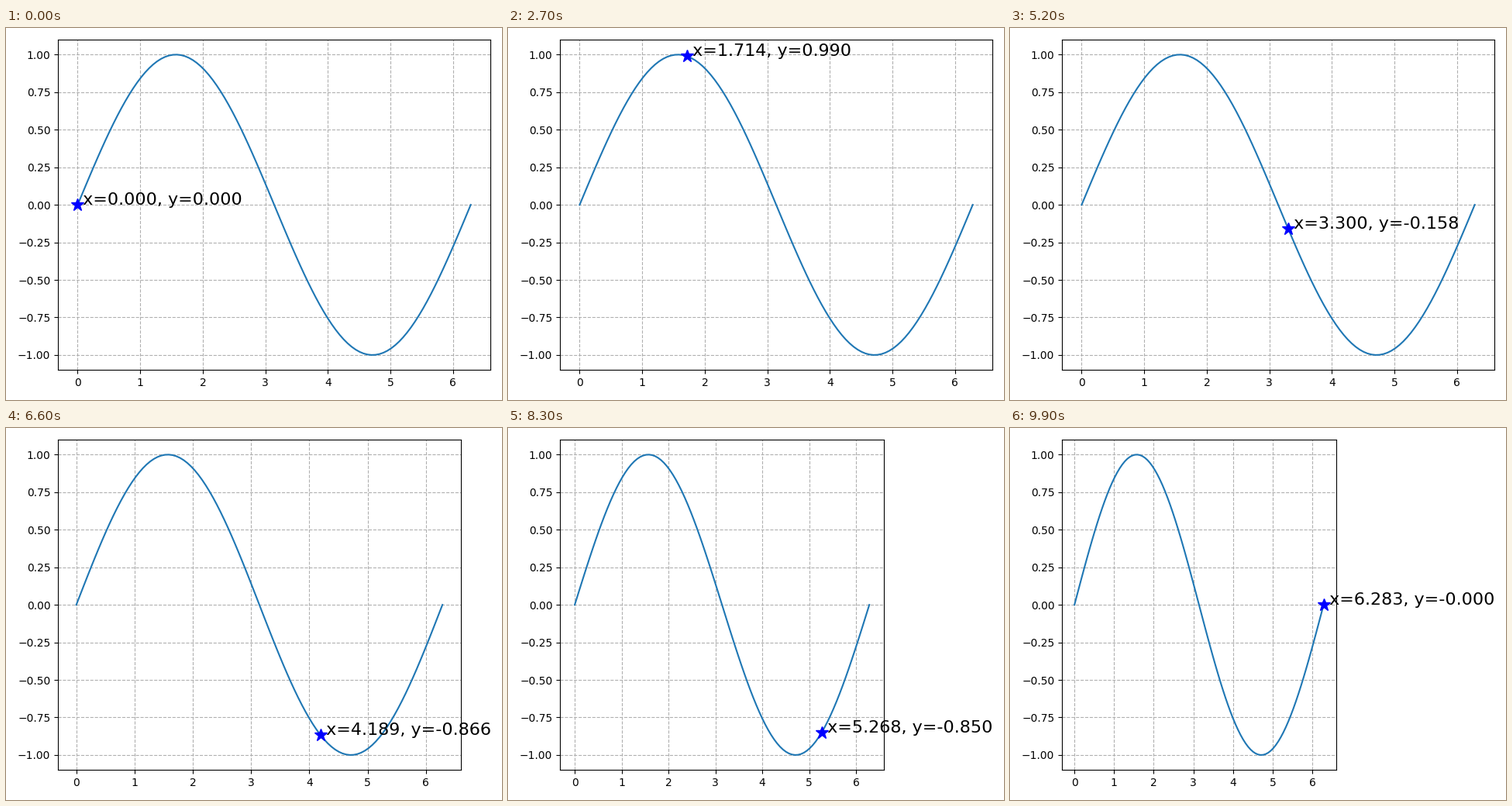
Animation, 640 px wide and 480 px high, one loop 10000 ms. Source, as a matplotlib script:

```python
import numpy as np
import matplotlib.pyplot as plt
from matplotlib.animation import FuncAnimation

STEPS = 100
WIDTH, HEIGHT, DPI = 640, 480, 100

x = np.linspace(0, 2 * np.pi, STEPS)
y = np.sin(x)

fig, ax = plt.subplots(figsize=(WIDTH / DPI, HEIGHT / DPI), dpi=DPI)
ax.plot(x, y)
ax.grid(linestyle="--")
star, = ax.plot(x[:1], y[:1], "b*", markersize=12)
label = ax.text(0, 0, "", fontsize=16)


def place(i):
    star.set_data([x[i]], [y[i]])
    label.set_position((x[i], y[i]))
    label.set_text(f" x={x[i]:.3f}, y={y[i]:.3f}")


def right_edges():
    """Right side of the axes per step, shrinking to keep the label inside."""
    place(0)
    fig.tight_layout()
    full = fig.subplotpars.right
    edges = []
    for i in range(STEPS):
        place(i)
        # two layout passes per step: the axes lag slightly behind the label
        for _ in range(2):
            over = label.get_window_extent().x1 - ax.bbox.x1
            fig.subplots_adjust(right=full - max(0, over) / WIDTH)
        edges.append(fig.subplotpars.right)
    return edges


edges = right_edges()


def update(i):
    place(i)
    fig.subplots_adjust(right=edges[i])
    return star, label


update(0)
anim = FuncAnimation(fig, update, frames=STEPS, interval=100, repeat=True)
plt.show()
```
